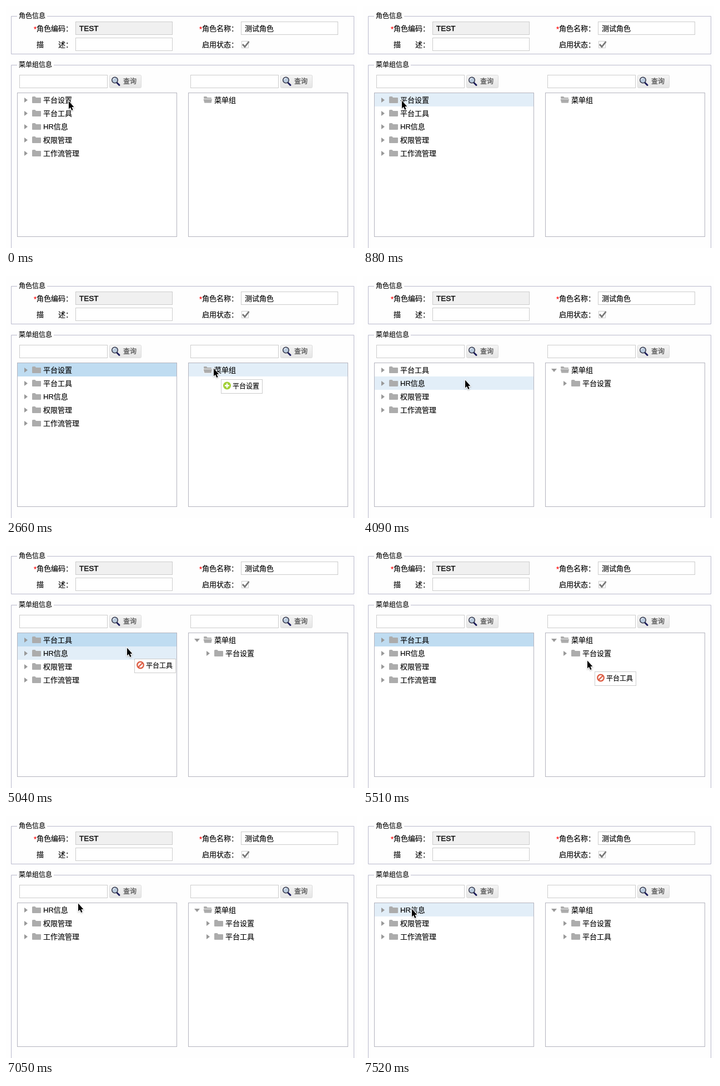
Recreate the animation shown at these times as an HTML page. Size 632 by 436 pixels, loop 8 s.

```html
<!DOCTYPE html>
<html lang="zh-CN">
<head>
<meta charset="utf-8">
<style>
html, body { margin: 0; width: 100%; height: 100%; overflow: hidden; background: #fefefe }
svg { display: block; width: 632px; height: 436px }
text { font: 13px "Liberation Sans", "Noto Sans CJK SC", "Noto Sans CJK", sans-serif; fill: #000; stroke: #000; stroke-width: .15px; white-space: pre }
.small { font-size: 12px }
.star { fill: red; stroke: red }
.button { font-size: 12px; fill: #555; stroke: #555; stroke-width: .3px }
.frame { fill: none; stroke: #b9b9cc }
.panel { fill: #fff; stroke: #b4b4be }
.field { fill: #fff; stroke: #ccc }
</style>
</head>
<body>
<svg viewBox="0 0 632 436">
  <defs>
    <linearGradient id="shade" x2="0" y2="1"><stop stop-color="#f5f5f5"/><stop offset="1" stop-color="#e5e5e5"/></linearGradient>
    <path id="shut" fill="#acacac" d="M0 1.5q0-1.5 1.5-1.5h4l1.5 2h8q1 0 1 1v8q0 1-1 1h-14q-1 0-1-1z"/>
    <g id="open" fill="#acacac">
      <path d="M1 1q0-1 1-1h4l1.500 2h6.500q1 0 1 1v2h-13.500z"/>
      <path stroke="#fff" stroke-width=".8" d="M0 4.500h16.500l-1.500 7.500h-13z"/>
    </g>
    <g id="yes">
      <circle r="7" fill="#a2d037"/>
      <path d="M-4 0h8M0-4v8" stroke="#fff" stroke-width="2.4"/>
    </g>
    <g id="no" fill="#fbeeea" stroke="#dc5a41" stroke-width="2.2">
      <circle r="5.8"/><path d="M-4 4L4-4"/>
    </g>
    <g id="search">
      <rect class="field" x="24.5" y="124.5" width="158" height="23"/>
      <rect x="186.5" y="124.5" width="57" height="23" rx="2" fill="url(#shade)" stroke="#dcdcdc"/>
      <path d="M199.500 138l4.500 4.500" stroke="#1d1d5c" stroke-width="3" stroke-linecap="round"/>
      <circle cx="196" cy="133.500" r="5.300" fill="#b9cadd" stroke="#33364a" stroke-width="1.500"/>
      <path d="M192.500 133q.5-3 3.500-3" fill="none" stroke="#fff"/>
      <text class="button" x="211" y="140">查询</text>
      <rect class="panel" x="20.5" y="156.5" width="287" height="259"/>
    </g>
  </defs>

  <path class="frame" d="M20 18.5H9.5v68h617v-68H74"/>
  <path class="frame" d="M20 106.5H9.5V440h617V106.5H86"/>
  <text class="small" x="23" y="22">角色信息</text>
  <text class="small" x="23" y="110">菜单组信息</text>

  <text class="star" x="50" y="46">*</text>
  <text x="55" y="45">角色编码：</text>
  <text x="55" y="74">描　　述：</text>
  <text class="star" x="348" y="46">*</text>
  <text x="353" y="45">角色名称：</text>
  <text x="353" y="74">启用状态：</text>
  <rect class="field" x="125.5" y="28.5" width="174" height="23" style="fill:#f0f0f0"/>
  <rect class="field" x="125.5" y="57.5" width="174" height="23"/>
  <rect class="field" x="423.5" y="28.5" width="174" height="23"/>
  <text x="132" y="45" style="font-size:13.5px;stroke-width:.4px">TEST</text>
  <text x="430" y="45">测试角色</text>
  <rect class="field" x="424.5" y="63.5" width="12" height="12"/>
  <path d="M426 69l4 4.500 7.500-9.500" fill="none" stroke="#777" stroke-width="2.800"/>

  <use href="#search"/>
  <use href="#search" x="308"/>
  <g id="live"></g>
  <path id="arrow" d="M0 0.500V14.500L3 11.700 5.300 17 7.600 16 5.400 11H9.400Z" stroke="#fff" stroke-width="2" paint-order="stroke" style="filter:drop-shadow(0 1px 1px #0004)"/>
</svg>
<script>
const LOOP = 8000, STEP = 115, TOP = 157, ROW = 24, RIGHT = 308;
const live = document.getElementById('live'), arrow = document.getElementById('arrow');
const names = ['平台设置', '平台工具', 'HR信息', '权限管理', '工作流管理'];
const drags = [{ from: 2200, drop: 3380 }, { from: 5040, drop: 6570 }];

// pointer strokes: first visible step, number of steps, end point
const home = { x: 113, y: 171 };
const strokes = [
  { at: 350, steps: 2, x: 98, y: 166 },
  { at: 760, steps: 3, x: 67, y: 171 },
  { at: 1600, steps: 2, x: 76, y: 171 },
  { at: 2080, steps: 1, x: 127, y: 171 },
  { at: 2200, steps: 5, x: 374, y: 166 },
  { at: 3850, steps: 3, x: 184, y: 187 },
  { at: 4330, steps: 5, x: 114, y: 170 },
  { at: 5040, steps: 5, x: 404, y: 206 },
  { at: 5860, steps: 3, x: 403, y: 203 },
  { at: 6930, steps: 2, x: 130, y: 157 },
  { at: 7170, steps: 4, x: 88, y: 167 }
];

const easeOut = u => 1 - (1 - u) ** 2;

function pointer(t) {
  let { x, y } = home;
  for (const s of strokes) {
    if (t < s.at) break;
    const done = Math.min(s.steps, Math.floor((t - s.at) / STEP) + 1);
    const k = easeOut(done / s.steps);
    x += (s.x - x) * k;
    y += (s.y - y) * k;
  }
  return [Math.round(x), Math.round(y)];
}

const text = (s, x, y, cls = '') => `<text class="${cls}" x="${x}" y="${y}">${s}</text>`;
const use = (id, x, y) => `<use href="#${id}" x="${x}" y="${y}"/>`;
const bar = (dx, row, color) =>
  `<rect x="${21 + dx}" y="${TOP + row * ROW}" width="286" height="${ROW}" fill="${color}"/>`;

function node(name, dx, row, icon, twist) {
  const y = TOP + row * ROW;
  const tri = { right: `M${33 + dx} ${y + 8}v9l6-4.5z`, down: `M${31 + dx} ${y + 10}h10l-5 6z` }[twist];
  return (tri ? `<path d="${tri}" fill="#999"/>` : '') +
    use(icon, 47 + dx, y + 6) + text(name, 67 + dx, y + 17);
}

function proxy(name, x, y, ok) {
  return `<rect x="${x + 13.5}" y="${y + 20.5}" width="74" height="25" fill="#fff" stroke="#ccc"/>` +
    use(ok ? 'yes' : 'no', x + 24, y + 31.5) + text(name, x + 34, y + 37, 'small');
}

function render(t) {
  const [x, y] = pointer(t);
  const moved = drags.filter(d => t >= d.drop).length;
  const dragging = drags.some(d => t >= d.from && t < d.drop);
  const left = names.slice(moved), right = names.slice(0, moved);

  const row = Math.floor((y - TOP - 1) / ROW);
  const awake = t >= strokes[1].at && row >= 0;
  const onLeft = awake && x > 20 && x < 308 && row < left.length;
  const onRight = awake && x > 328 && x < 616 && row <= moved;

  let out = '';
  if (onLeft) out += bar(0, row, '#e2eef8');
  if (onRight) out += bar(RIGHT, row, '#e2eef8');
  if (dragging) out += bar(0, 0, '#bfdcf1');
  left.forEach((n, i) => out += node(n, 0, i, 'shut', 'right'));
  out += node('菜单组', RIGHT, 0, 'open', moved ? 'down' : '');
  right.forEach((n, i) => out += node(n, RIGHT + 20, i + 1, 'shut', 'right'));
  if (dragging) out += proxy(left[0], x, y, onRight);

  arrow.setAttribute('transform', `translate(${x} ${y})`);
  return out;
}

let shown;
function tick() {
  const out = render(performance.now() % LOOP);
  if (out !== shown) live.innerHTML = shown = out;
  requestAnimationFrame(tick);
}
tick();
</script>
</body>
</html>
```
